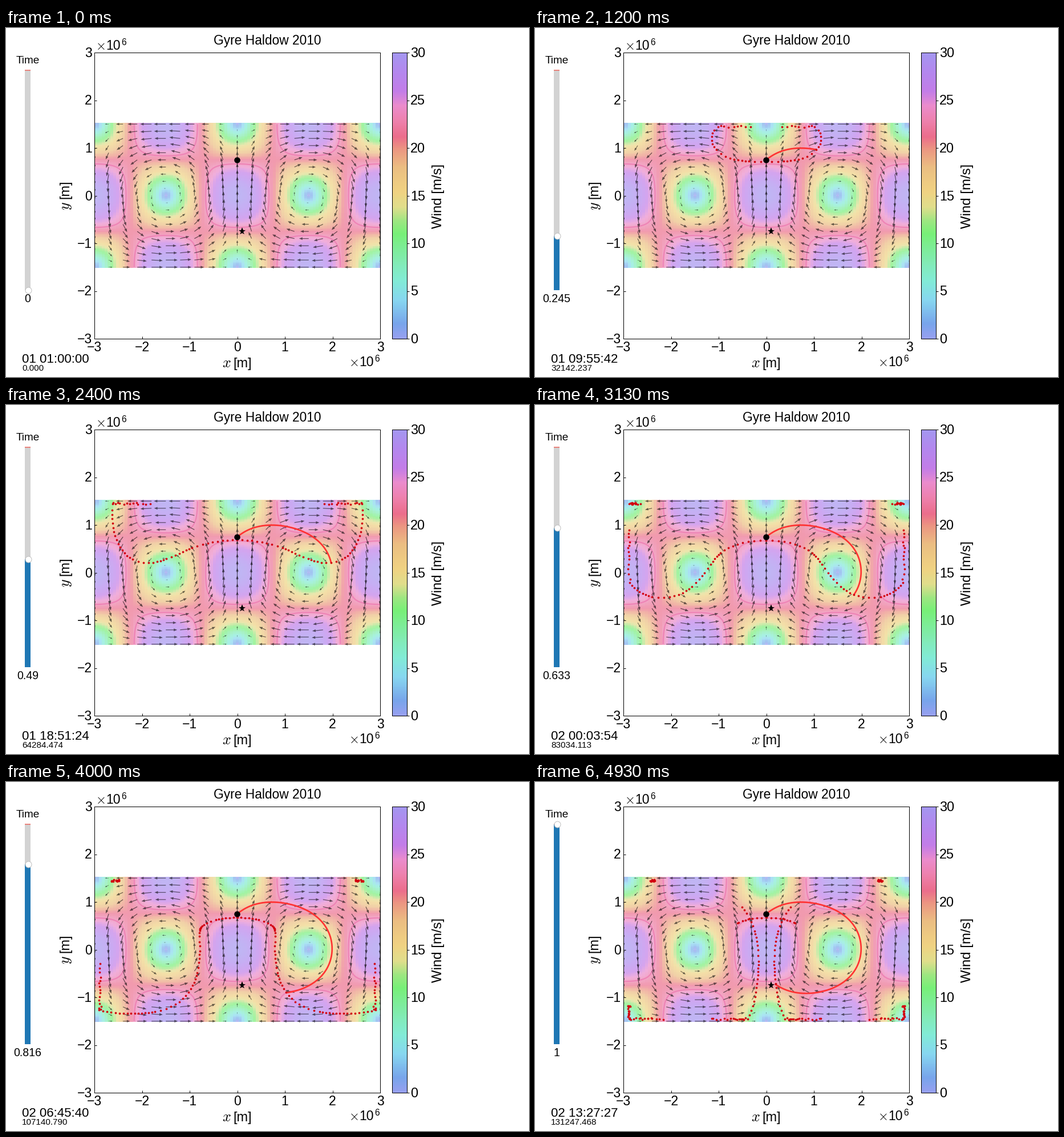
Write a matplotlib script that moves like this. It is 917 px wide and 611 px high and loops after 5.06 s.

```python
import numpy as np
import matplotlib.pyplot as plt
from matplotlib.animation import FuncAnimation
from matplotlib.colors import LinearSegmentedColormap
from matplotlib.patches import Rectangle

W, H, DPI = 917, 611, 64
PX = 72 / DPI                      # points per pixel
STEPS, SUB = 49, 10                # time steps of the slider, integration substeps
T_END = 131247.46825               # seconds
TICK, LOOP = 20, 5060              # ms

# Lengths in 1e6 m, times in seconds
WIND, AIR, K = 30e-6, 23e-6, np.pi / 3
START, GOAL = (0, 0.75), (0.1, -0.75)
SCALE, CX, CY = 83.5, 405.5, 293.5

COLORS = [(0, "#96a0f0"), (1.5, "#78a5eb"), (4, "#87d7f0"), (6, "#82ebd7"),
          (8, "#82ebb4"), (11, "#78f078"), (12.4, "#a0e682"), (13.8, "#e1de8c"),
          (15.5, "#f0d282"), (18, "#ebbe82"), (20, "#ec9482"), (21.2, "#eb6e8c"),
          (23, "#ee82af"), (24.5, "#eb8ccd"), (26, "#c37de8"), (28, "#b487ee"),
          (30, "#a596f0")]
CMAP = LinearSegmentedColormap.from_list("wind", [(v / 30, c) for v, c in COLORS])


def wind(x, y):
    return (WIND * np.sin(K * x) * np.sin(K * y),
            WIND * np.cos(K * x) * np.cos(K * y))


def rates(state, wall):
    """Zermelo navigation: drift plus own speed, with the optimal turn rate."""
    x, y, th = state
    u, v = wind(x, y)
    turn = K * WIND * (np.sin(2 * th) * np.cos(K * x) * np.sin(K * y)
                       - np.sin(K * x) * np.cos(K * y))
    return np.array([np.where(wall == 2, 0, u + AIR * np.cos(th)),
                     np.where(wall == 1, 0, v + AIR * np.sin(th)),
                     np.where(wall > 0, 0, turn)])


def apply_walls(state, wall, xlim, ylim):
    """Particles reaching an edge slide along it and turn back at the corners."""
    x, y, th = state
    out_x, out_y = np.abs(x) > xlim, np.abs(y) > ylim
    th[:] = np.where(out_x & (wall == 1), np.where(x > 0, np.pi, 0), th)
    th[:] = np.where(out_y & (wall == 2), -np.sign(y) * np.pi / 2, th)
    hit_y = out_y & (wall == 0)
    hit_x = out_x & (wall == 0) & ~hit_y
    rising = wind(x, y)[1] + AIR * np.sin(th) > 0
    th[:] = np.where(hit_y, np.where(np.cos(th) >= 0, 0, np.pi), th)
    th[:] = np.where(hit_x, np.where(rising, 1, -1) * np.pi / 2, th)
    wall[hit_y], wall[hit_x] = 1, 2
    x[:] = np.clip(x, -xlim, xlim)
    y[:] = np.clip(y, -ylim, ylim)


def past_focus(state, wall):
    """Where the front has folded over, so that particles trail behind it."""
    tx, ty = np.gradient(state[:2], axis=1)
    flipped = np.cos(state[2]) * ty - np.sin(state[2]) * tx < 0
    return flipped & (wall + np.roll(wall, 1) + np.roll(wall, -1) == 0)


def simulate(seeds=16, refine=256):
    """Track the eastern half of the front and choose evenly spaced dots on it."""
    count = (seeds - 1) * refine + 1
    rng = np.random.default_rng(4)
    xlim, ylim = rng.uniform(2.86, 2.91, count), rng.uniform(1.43, 1.47, count)
    state = np.array([np.full(count, START[0], float), np.full(count, START[1], float),
                      np.linspace(-np.pi / 2, np.pi / 2, count)])
    wall, alive = np.zeros(count, int), np.ones(count, bool)
    dt = T_END / (STEPS * SUB)
    track = np.empty((STEPS * SUB + 1, 2, count), np.float32)
    track[0] = state[:2]
    kept, dots = list(range(0, count, refine)), []
    for i in range(STEPS * SUB + 1):
        if i:
            mid = state + dt / 2 * rates(state, wall)
            state = state + dt * rates(mid, wall)
            apply_walls(state, wall, xlim, ylim)
            track[i] = state[:2]
        if i % SUB == 0:
            alive &= ~past_focus(state, wall)
            extra = []
            for a, b in zip(kept, kept[1:]):
                gap = SCALE * np.hypot(*(state[:2, a] - state[:2, b]))
                if 11 < gap < 30 and wall[a] == wall[b] and b - a > 1:
                    extra.append((a + b) // 2)
            kept = [k for k in sorted(kept + extra) if alive[k]]
            x, y = state[:2, kept]
            dots.append((np.concatenate([x, -x]), np.concatenate([y, y])))
    return track, dots


def best_path(track):
    """The extremal that passes closest to the route's way points."""
    stops = [(7, 447, 211), (16, 526, 222), (24, 570, 276),
             (31, 563, 326), (40, 492, 370), (49, 420, 355)]
    miss = sum((track[n * SUB, 0] - (px - CX) / SCALE) ** 2
               + (track[n * SUB, 1] - (CY - py) / SCALE) ** 2 for n, px, py in stops)
    return track[:, :, np.argmin(miss)]


track, dots = simulate()
path = best_path(track)

fig = plt.figure(figsize=(W / DPI, H / DPI), dpi=DPI, facecolor="white")

# Wind map
ax = fig.add_axes([155 / W, (H - 544) / H, 501 / W, 501 / H])
ax.set_xticks([])
ax.set_yticks([])
for spine in ax.spines.values():
    spine.set_linewidth(1 * PX)

gx, gy = np.meshgrid(np.linspace(-3, 3, 101), np.linspace(-1.5, 1.5, 101))
ax.imshow(np.hypot(*wind(gx, gy)) * 1e6, cmap=CMAP, vmin=0, vmax=30, alpha=0.7,
          origin="lower", extent=[-3.03, 3.03, -1.515, 1.515],
          interpolation="nearest", aspect="auto")
fx, fy = np.meshgrid(np.linspace(-3, 3, 241), np.linspace(-1.5, 1.5, 121))
ax.contour(fx, fy, np.hypot(*wind(fx, fy)) * 1e6, [AIR * 1e6],
           colors=["#ee84b6"], linewidths=2.2 * PX)
qx, qy = np.meshgrid(np.linspace(-3, 3, 21), np.linspace(-1.5, 1.5, 21))
ax.quiver(qx, qy, *wind(qx, qy), angles="xy", scale_units="xy", scale=WIND / 0.25,
          units="dots", width=1.15, headwidth=4, headlength=5.2, headaxislength=5.2,
          minshaft=2.2, minlength=0.3, color=(0, 0, 0, 0.6), zorder=3)
route, = ax.plot([], [], color="#ff3232", lw=2.7 * PX, zorder=4)
front, = ax.plot([], [], "o", color="#d2000f", ms=3.7 * PX, mew=0, zorder=5)
ax.plot(*START, "o", color="black", ms=10.5 * PX, mew=0, zorder=6)
ax.plot(*GOAL, "*", color="black", ms=13.5 * PX, mew=0, zorder=6)
ax.set(xlim=(-3, 3), ylim=(-3, 3))

# Everything else lives in pixel coordinates
stage = fig.add_axes([0, 0, 1, 1])
stage.axis("off")


def label(x, y, s, size=23, ha="left", va="baseline", **kw):
    return stage.text(x, y, s, fontsize=size * PX, ha=ha, va=va,
                      family="Liberation Sans", **kw)


def line(xs, ys, color="black", width=1):
    stage.plot(xs, ys, color=color, lw=width * PX, solid_capstyle="butt")


def power(x, y):
    label(x, y, r"$\times$", 23, math_fontfamily="cm")
    label(x + 18, y, "10")
    label(x + 45, y - 8, "6", 15.5)


for v in range(-3, 4):
    text = str(v).replace("-", "−")
    px, py = CX + SCALE * v, CY - SCALE * v
    label(px, 566, text, ha="center")
    label(151, py + 8, text, ha="right")
    if abs(v) < 3:
        line([px, px], [540, 544])
        line([155, 159], [py, py])
power(157, 38.5)
power(601, 591.5)
label(458, 29, "Gyre Haldow 2010", 22.8, "center")
label(379, 594, "$x$", 26, math_fontfamily="cm")
label(398, 594, "[m]", 23.5)
label(106, 312, "$y$", 26, "center", "center", rotation=90, math_fontfamily="cm")
label(104, 283, "[m]", 23.5, "center", "center", rotation=90)

# Colour bar
stage.imshow(np.linspace(0, 1, 256)[:, None], cmap=CMAP, origin="lower",
             extent=[676.5, 702.5, 544, 43], aspect="auto")
stage.add_patch(Rectangle((676.5, 43), 26, 501, fill=False, lw=1 * PX))
for v in range(0, 31, 5):
    py = 544 - 501 * v / 30
    line([702.5, 706.5], [py, py])
    label(709, py + 8, str(v), 23.5)
label(758, 294, "Wind [m/s]", 24, "center", "center", rotation=90)

# Slider and clock
BOTTOM, TRAVEL = 458.5, 385
label(38, 62, "Time", 19, "center")
stage.add_patch(Rectangle((33, BOTTOM - TRAVEL), 10, TRAVEL, color="#d3d3d3", lw=0))
line([33, 43], [73.5, 73.5], "#eb645a", 1.5)
fill = stage.add_patch(Rectangle((33, BOTTOM), 10, 0, color="#1f77b4", lw=0, zorder=3))
knob, = stage.plot([38.5], [BOTTOM], "o", mfc="white", mec="#c0c0c0",
                   ms=11 * PX, mew=1 * PX, zorder=4)
value = label(38, 480, "0", 19.5, "center")
clock = label(28, 586.5, "", 22.3)
seconds = label(28, 600.5, "", 15.3)
stage.set(xlim=(0, W), ylim=(H, 0))


def step_at(ms):
    """Steps last 130 and 70 ms in turn."""
    pair, rest = divmod(ms, 200)
    return min(2 * pair + (rest >= 130), STEPS)


def update(i):
    n = step_at(TICK * i + TICK // 2)
    part = n / STEPS
    t = T_END * part
    front.set_data(*dots[n])
    route.set_data(*path[:n * SUB + 1].T)
    y = BOTTOM - TRAVEL * part
    knob.set_data([38.5], [y])
    fill.set_y(y)
    fill.set_height(BOTTOM - y)
    value.set_text(f"{round(part, 3):g}")
    total = int(t) + 3600
    clock.set_text(f"{1 + total // 86400:02d} {total // 3600 % 24:02d}:"
                   f"{total // 60 % 60:02d}:{total % 60:02d}")
    seconds.set_text(f"{t:.3f}")
    return front, route, knob, fill, value, clock, seconds


anim = FuncAnimation(fig, update, frames=LOOP // TICK, interval=TICK,
                     repeat=True, repeat_delay=0, blit=False)
plt.show()
```
